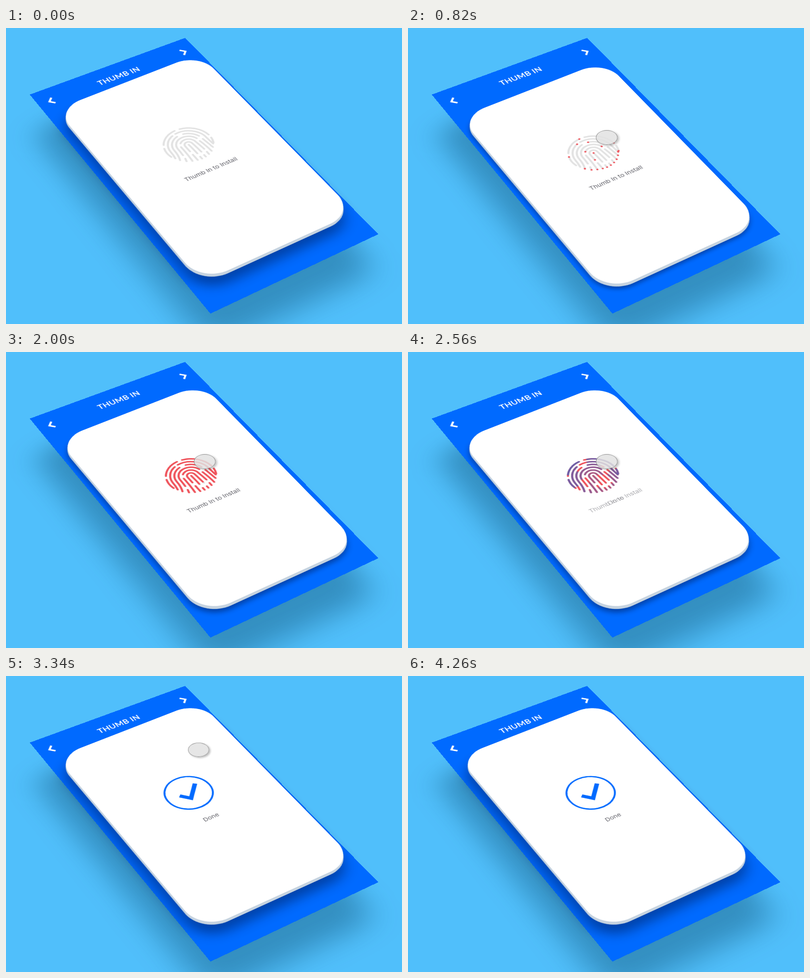
An HTML page that plays this animation: 800 by 600 pixels, repeating every 4.3 s.

```html
<!DOCTYPE html>
<html lang="en">
<head>
<meta charset="utf-8">
<style>
html, body { margin: 0; width: 100%; height: 100%; overflow: hidden; background: #50bffb; }
#stage { position: absolute; left: 0; top: 0; width: 800px; height: 600px; overflow: hidden; }
#stage > div { position: absolute; left: 0; top: 0; transform-origin: 0 0; }
#phone, #shade { width: 350px; height: 630px; }
#phone { background: #006aff; }
#shade { background: rgba(0, 60, 92, .36); border-radius: 50px; filter: blur(28px); }
#card { width: 331px; height: 540px; border-radius: 55px; background: #fff; }
#cursor { width: 44px; height: 30px; box-sizing: border-box; border-radius: 50%;
  border: 1.2px solid #939393; background: rgba(226, 226, 226, .84); box-shadow: 3px 2px 4px rgba(0, 0, 0, .25); }
svg { position: absolute; left: 0; top: 0; overflow: visible; }
path { fill: none; }
text { text-anchor: middle; }
#card text { font: 13.2px Inter, Roboto, sans-serif; fill: #5c5c64; }
#phone text { font: 500 17.5px Lato, sans-serif; letter-spacing: .6px; fill: #fff; stroke: #fff; stroke-width: .4px; }
#print path { stroke-width: 4; stroke-linecap: round; }
</style>
</head>
<body>
<div id="stage">
  <div id="shade"></div>
  <div id="phone">
    <svg width="350" height="630">
      <text x="174.500" y="43">THUMB IN</text>
      <path d="M31 28l-8.500 8.500l8.500 8.500M319 28l8.500 8.500l-8.500 8.500" stroke="#fff" stroke-width="4"/>
    </svg>
  </div>
  <div id="card">
    <svg width="331" height="540">
      <g transform="translate(168.200 223.800)">
        <g id="print"></g>
        <path id="ring" d="M0 -46.300A46.300 46.300 0 0 1 0 46.300A46.300 46.300 0 0 1 0 -46.300" pathLength="1" stroke="#006aff" stroke-width="3.600"/>
        <path id="check" d="M-19.400 -1.200L-4.400 15.800L24 -16" stroke="#006aff" stroke-width="8.700"/>
        <text id="ask" y="85">Thumb In to Install</text>
        <text id="done" y="85">Done</text>
      </g>
    </svg>
  </div>
  <div id="cursor"></div>
</div>
<script>
const LOOP = 4300;
const $ = id => document.getElementById(id);
const clamp = x => Math.min(1, Math.max(0, x));
const span = (t, from, to) => clamp((t - from) / (to - from));
const mix = (a, b, k) => a + (b - a) * k;
const easeOut = x => 1 - (1 - x) ** 3;
const easeInOut = x => x * x * (3 - 2 * x);

// Maps a flat w x h box onto four screen corners: TL, TR, BR, BL.
function project(w, h, [x0, y0], [x1, y1], [x2, y2], [x3, y3]) {
  const ux = x1 - x2, uy = y1 - y2, vx = x3 - x2, vy = y3 - y2;
  const sx = x0 - x1 + x2 - x3, sy = y0 - y1 + y2 - y3;
  const det = ux * vy - vx * uy;
  const g = (sx * vy - vx * sy) / det, k = (ux * sy - sx * uy) / det;
  const m = [
    (x1 - x0 + g * x1) / w, (y1 - y0 + g * y1) / w, 0, g / w,
    (x3 - x0 + k * x3) / h, (y3 - y0 + k * y3) / h, 0, k / h,
    0, 0, 1, 0, x0, y0, 0, 1];
  return `matrix3d(${m.map(n => n.toFixed(8))})`;
}
const phoneMap = project(350, 630, [48, 135], [362, 20], [752, 418], [413, 579]);
const cardMap = project(331, 540, [101, 165.1], [390.2, 52.3], [705.3, 374], [395, 515.5]);
$('phone').style.transform = phoneMap;
$('shade').style.transform = `translate(2px, 72px) ${phoneMap}`;

function arc(r, from, to) {
  const at = deg => [Math.cos(deg * Math.PI / 180) * r, Math.sin(deg * Math.PI / 180) * r].map(n => n.toFixed(2));
  return `M${at(from)}A${r} ${r} 0 ${Math.abs(to - from) > 180 ? 1 : 0} ${to > from ? 1 : 0} ${at(to)}`;
}
// Ridges from the rim to the core, each in its drawing direction.
const ridges = [
  arc(48, -93, -150),
  arc(48, -5, -80),
  arc(48, -162, -195),
  arc(48, 24, 6),
  arc(40, -110, -180) + 'Q-40 10 -42 20',
  'M41.5 22Q40.5 10 40 0A40 40 0 0 0 -6 -39.5',
  'M-37 29Q-32 16 -32 0A32 32 0 0 1 -7 -31.2',
  arc(32, -78, -20),
  'M36 30Q34 14 32 0',
  arc(24, -18, -180) + 'Q-24 8 -25 20',
  'M-28 38L-26 30',
  'M28 38Q27 18 24 2',
  arc(16, -137, 0) + 'Q18 14 19 26',
  'M19 43L19.2 35',
  'M-18 43Q-16 26 -16 -2',
  'M-8 46V28',
  'M-8 18V0A8 8 0 0 1 8 0Q9.5 16 10 30',
  'M10 46V40',
  'M0 0Q1 16 1 30',
  'M1 47V40'
];
function layer(color) {
  return ridges.map(d => {
    const path = document.createElementNS('http://www.w3.org/2000/svg', 'path');
    path.setAttribute('d', d);
    path.setAttribute('stroke', color);
    path.setAttribute('pathLength', 1);
    $('print').append(path);
    return path;
  });
}
const gray = layer('#e2e2e2'), red = layer('#f0525a'), blue = layer('#1563d8');

function trim(path, from, to, opacity = 1) {
  const len = to - from;
  path.style.opacity = len > 0.001 ? opacity : 0;
  path.style.strokeDasharray = `${Math.max(len, 0.001)} 2`;
  path.style.strokeDashoffset = -from;
}

function spring(t) {
  if (t <= 0) return 0;
  const w = Math.PI / 180, k = 0.0095;
  return 1 - Math.exp(-k * t) * (Math.cos(w * t) + k / w * Math.sin(w * t));
}

function drawCard(t) {
  const p = spring(t - 645) - spring(t - 2600);
  const card = $('card').style;
  card.transform = `translate(${2.7 * p}px, ${11.8 * p}px) scale(${1 + 0.0062 * p}, ${1 + 0.0103 * p}) ${cardMap}`;
  const edge = [1, 2, 3, 4].map(i => `${-0.92 * i}px ${1.5 * i}px #c6d3e0`);
  const blur = mix(26, 12, p);
  card.boxShadow = `${edge}, ${mix(-15, -8, p)}px ${mix(25, 13, p)}px ${blur}px rgba(0, 20, 70, .46)`;
}

function drawPrint(t) {
  const wipe = easeInOut(span(t, 2680, 3120));
  ridges.forEach((_, i) => {
    const depth = i / ridges.length;
    const grow = easeInOut(span(t, 760, mix(1900, 2280, depth)));
    const tint = easeInOut(span(t, 2380, mix(2600, 2720, depth)));
    const head = wipe * 0.5, tail = 1 - wipe * 0.5;
    gray[i].style.opacity = 1 - span(t, 2480, 2720);
    trim(red[i], head, Math.min(grow, tail));
    trim(blue[i], head, Math.min(tint, tail), mix(0.6, 0.25, depth));
  });
  trim($('ring'), 0, easeOut(span(t, 2660, 2920)));
  const pop = span(t, 2740, 2900);
  $('check').style.opacity = pop;
  $('check').style.transform = `scale(${easeOut(pop) * (1 + 0.06 * (1 - span(t, 2900, 3060)))})`;
  const swap = span(t, 2450, 2690);
  $('ask').style.opacity = 1 - swap;
  $('done').style.opacity = swap;
}

function drawCursor(t) {
  let x, y;
  if (t < 2600) {
    const k = easeInOut(span(t, 170, 480));
    x = mix(281, 401.5, k);
    y = mix(58, 222, k);
  } else if (t < 3350) {
    const k = span(t, 2600, 3340);
    x = mix(401.5, 389, k);
    y = mix(222, 149.5, easeOut(k));
  } else {
    const k = easeInOut(span(t, 3350, 3900));
    x = mix(389, 262, k);
    y = mix(149.5, 67, k);
  }
  const size = mix(1, 0.97, span(t, 2600, 2900));
  $('cursor').style.transform = `translate(${x - 22 * size}px, ${y - 15 * size}px) scale(${size})`;
  $('cursor').style.opacity = span(t, 170, 270) * (1 - span(t, 3900, 4240));
}

function frame() {
  const t = performance.now() % LOOP;
  drawCard(t);
  drawPrint(t);
  drawCursor(t);
  requestAnimationFrame(frame);
}
frame();
</script>
</body>
</html>
```
